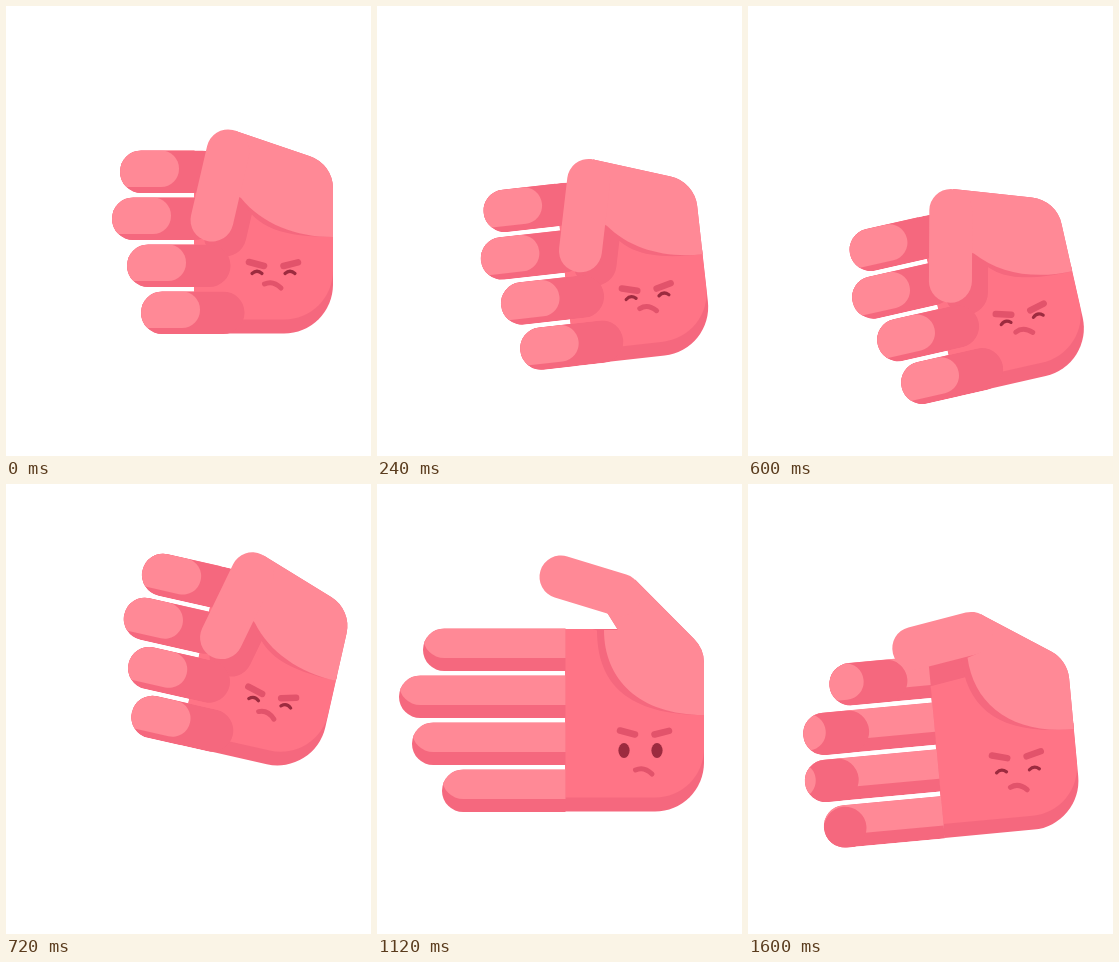
Write an HTML page with a canvas that moves like this. It is 365x450 px and loops after 1640 ms.

```html
<!DOCTYPE html>
<html lang="en">
<head>
<meta charset="utf-8">
<title>Hand game</title>
<style>
  html, body { margin: 0; width: 100%; height: 100%; overflow: hidden; background: #fff; }
  canvas { display: block; width: 365px; height: 450px; }
</style>
</head>
<body>
<canvas id="stage" width="365" height="450"></canvas>
<script>
const ctx = document.getElementById('stage').getContext('2d');
const LOOP = 1640, STEP = 40;
const LIGHT = '#ff8996', SKIN = '#ff7486', DARK = '#f5687e', BROW = '#e2536b', EYE = '#9c2b3f';
const LEFT = 188, RIGHT = 327, TOP = 145, BOTTOM = 327.5, WRIST = 231;
const BAND = 13, FINGER = 42.5, PITCH = 47, THUMB = 21.5;
const OPEN_TIPS = [50, 26, 39, 69], FIST_TIPS = [114, 106, 121, 135];

const clamp = v => Math.max(0, Math.min(1, v));
const mix = (a, b, k) => a + (b - a) * k;
const mixPt = (a, b, k) => [mix(a[0], b[0], k), mix(a[1], b[1], k)];
const shift = (p, x, y) => [p[0] + x, p[1] + y];
const ease = k => k < .5 ? .5 * (2 * k) ** 2.8 : 1 - .5 * (2 - 2 * k) ** 2.8;
const ramp = (t, from, to) => ease(clamp((t - from) / (to - from)));

// Eased value from [time, value] keys
function track(t, keys) {
  let value = keys[0][1];
  for (let i = 1; i < keys.length; i++) {
    value = mix(value, keys[i][1], ramp(t, keys[i - 1][0], keys[i][0]));
  }
  return value;
}

function box(color, x, y, w, h, r) {
  ctx.fillStyle = color;
  ctx.beginPath();
  ctx.roundRect(x, y, w, h, r);
  ctx.fill();
}

function line(color, width, from, to, bend = to) {
  ctx.strokeStyle = color;
  ctx.lineWidth = width;
  ctx.beginPath();
  ctx.moveTo(...from);
  ctx.quadraticCurveTo(...bend, ...to);
  ctx.stroke();
}

// Thumb joints for bend 0 (stretched) to 1 (fist); the palm side follows late
function thumbPose(bend) {
  const late = bend ** 3, swing = [157, 130];
  const root = mixPt([227, 146], [235, 192], late);
  return {
    late, root,
    tip: mixPt(mixPt([184, 93], swing, bend), mixPt(swing, [206, 214], bend), bend),
    knuckle: mixPt([243, 111], [222, 145], bend),
    corner: [RIGHT, mix(165, 158, bend)],
    web: mixPt([241, 146], root, late),
    arc1: [mix(262, 290, late), WRIST],
    arc2: shift(root, 21 * late, mix(49, 26, late))
  };
}

function palmPath(bottom) {
  ctx.beginPath();
  ctx.moveTo(LEFT, TOP);
  ctx.lineTo(240, TOP);
  ctx.lineTo(RIGHT, 225);
  ctx.arcTo(RIGHT, bottom, LEFT, bottom, 49);
  ctx.lineTo(LEFT, bottom);
  ctx.closePath();
}

function drawPalm({ tip, knuckle, late }) {
  ctx.save();
  palmPath(BOTTOM);
  ctx.fillStyle = DARK;
  ctx.fill();
  ctx.clip();
  palmPath(BOTTOM - 14);
  ctx.fillStyle = SKIN;
  ctx.fill();
  const shade = [13 * late, 20 - 5 * late];
  line(DARK, 2 * THUMB, shift(tip, ...shade), shift(knuckle, ...shade));
  ctx.restore();
}

// The tip first turns over, then the finger shortens and shows its pad
function drawFinger(i, fold, stretch) {
  const turn = clamp(fold * 4), bent = clamp((fold - .25) / .75);
  const x = mix(OPEN_TIPS[i], FIST_TIPS[i], bent) - 4 * stretch;
  const y = 144.5 + PITCH * i, r = FINGER / 2, base = LEFT + .5 - x;
  ctx.save();
  ctx.beginPath();
  ctx.roundRect(x, y, 280, FINGER, r);
  ctx.clip();
  box(DARK, x, y, base, FINGER, 0);
  box(LIGHT, x, y - BAND, base, FINGER, [r, 0, 0, r]);
  box(DARK, x, y + (1 - turn) * FINGER, FINGER + 61 * bent, FINGER, r);
  box(LIGHT, x - 60, y, 60 + 59 * bent, FINGER - 6, 18);
  ctx.restore();
}

function thenar(p, color, arc1, arc2, root) {
  const dx = p.corner[0] - p.knuckle[0], dy = p.corner[1] - p.knuckle[1];
  const tangent = Math.atan2(dy, dx) - Math.acos(THUMB / Math.hypot(dx, dy));
  ctx.fillStyle = color;
  ctx.beginPath();
  ctx.moveTo(...p.knuckle);
  ctx.lineTo(...shift(p.knuckle, THUMB * Math.cos(tangent), THUMB * Math.sin(tangent)));
  ctx.arcTo(...p.corner, RIGHT, WRIST, 34);
  ctx.lineTo(RIGHT, WRIST);
  ctx.bezierCurveTo(...arc1, ...arc2, ...root);
  ctx.lineTo(...p.web);
  ctx.lineTo(...mixPt(p.tip, p.knuckle, .5));
  ctx.fill();
}

function drawThumb(p) {
  thenar(p, DARK, shift(p.arc1, -11, 0), shift(p.arc2, -7, 5), shift(p.root, -7 * (1 - p.late), 0));
  thenar(p, LIGHT, p.arc1, p.arc2, p.root);
  line(LIGHT, 2 * THUMB, p.tip, p.knuckle);
}

function drawFace(eyes, frown) {
  const brow = 246.5 + 9.5 * frown, mouth = 287 - 8 * frown;
  line(BROW, 6.5, [243, brow], [258, brow + 4]);
  line(BROW, 6.5, [277.5, brow + 4], [292, brow + .3]);
  line(BROW, 5, [258.5, mouth - 1], [275, mouth + 3], [267, mouth - 5]);
  for (const side of [0, 33]) {
    const x = mix(251, 247, eyes) + side;
    if (eyes < .2) {
      line(EYE, 3.2, [x - 5, 267.5], [x + 5, 267.5], [x, 263]);
    } else {
      ctx.fillStyle = EYE;
      ctx.beginPath();
      ctx.ellipse(x, 266.5, 5.6, 7.6 * eyes, 0, 0, 2 * Math.PI);
      ctx.fill();
    }
  }
}

function draw(t) {
  const ending = clamp((t - 1440) / 160) ** 1.5;
  const pump = track(t, [[0, 0], [160, -1], [360, 1], [560, -1], [760, 1]]);
  const angle = 13.8 * pump * (1 - ramp(t, 760, 1080)) - 5.3 * ending;
  const lift = -37 * pump * (1 - ramp(t, 760, 950)) + 14 * ending;
  const bend = track(t, [[890, 1], [1120, 0], [1280, .13]]) + .32 * ending;
  const stretch = track(t, [[1060, 0], [1120, 1], [1280, 0]]);
  const awake = ramp(t, 780, 960);
  const eyes = awake * (1 - clamp((t - 1440) / 100));
  const pose = thumbPose(bend);

  ctx.setTransform(1, 0, 0, 1, 0, 0);
  ctx.fillStyle = '#fff';
  ctx.fillRect(0, 0, 365, 450);
  ctx.lineCap = 'round';
  ctx.translate(RIGHT + .22 * angle, WRIST + lift);
  ctx.rotate(angle * Math.PI / 180);
  ctx.translate(-RIGHT, -WRIST);

  drawPalm(pose);
  for (let i = 0; i < 4; i++) {
    const start = 890 + 12 * i;
    const fold = 1 - ramp(t, start, start + 190) + (.69 - .15 * i) * ending;
    drawFinger(i, fold, stretch);
  }
  drawThumb(pose);
  drawFace(eyes, 1 - awake + .35 * ending);
}

const begin = performance.now();
function tick() {
  const t = Math.max(0, performance.now() - begin) % LOOP;
  draw(Math.floor(t / STEP) * STEP);
  requestAnimationFrame(tick);
}
tick();
</script>
</body>
</html>
```
